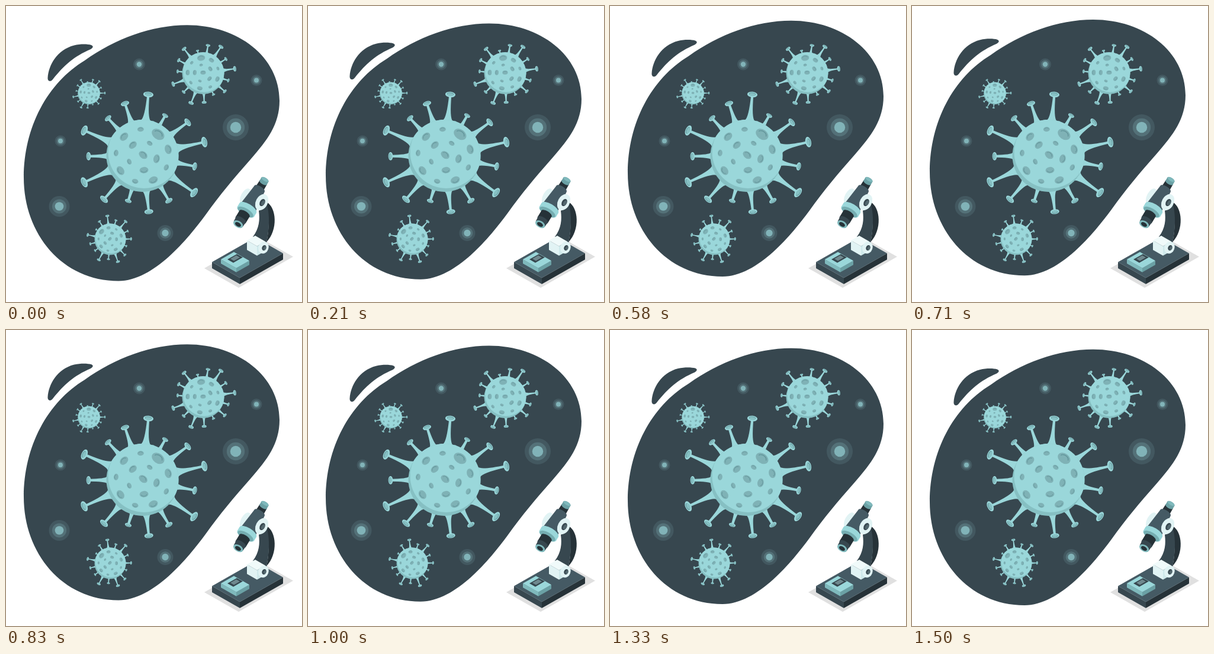
An HTML page with a canvas that plays this animation: 500x500 px, repeating every 1540 ms.

```html
<!DOCTYPE html>
<html lang="en">
<head>
<meta charset="utf-8">
<title>Virus under the microscope</title>
<style>
html, body { margin: 0; width: 100%; height: 100%; overflow: hidden; background: #fff; }
canvas { display: block; width: 500px; height: 500px; }
</style>
</head>
<body>
<canvas id="stage" width="500" height="500"></canvas>
<script>
const ctx = document.getElementById('stage').getContext('2d');
const LOOP = 1540, TURN = 720, LIFT = 10, RAD = Math.PI / 180;
const DARK = '#37474f', SLATE = '#455a64', INK = '#263238';
const AQUA = '#9ad7da', SHADE = '#86c0c3', TEAL = '#6ba1a5', PIT = '#7fb2b6', RIM = '#64989d', PALE = '#e1f3f4';

function fillPath(d, color) {
  ctx.fillStyle = color;
  ctx.fill(new Path2D(d));
}
function oval(x, y, rx, ry, deg, color) {
  ctx.beginPath();
  ctx.ellipse(x, y, rx, ry, deg * RAD, 0, Math.PI * 2);
  ctx.fillStyle = color;
  ctx.fill();
}
function placed(x, y, deg, paint) {
  ctx.save();
  ctx.translate(x, y);
  ctx.rotate(deg * RAD);
  paint();
  ctx.restore();
}

const BLOB = 'M30 290C30 205 70 130 133 92C184 55.5 246 32.2 306 32.2C392 32.2 462 86 462 160' +
  'C462 200 441 227 414 258C384 292 362 318 337 353C308 392 250 464.5 190 464.5C95 464.5 30 385 30 290Z';
const CRESCENT = 'M70.5 121C72 100 86 74 115 66.5C126 63.8 138 64.2 144 66C148 67.5 147.5 70.5 143 73' +
  'C115 85 98 100 79 124C75 129 70 127 70.5 121Z';

const glows = [[388, 205, 22], [90, 338.5, 17.5], [269, 383.5, 13.5], [225, 98.5, 10], [423, 125.5, 9.5], [92, 228, 9.5]];

// One virus design, drawn at several sizes and turns; r = body radius, k = spike scale
const viruses = [
  { x: 230.5, y: 253, r: 61, k: 1, turn: 0 },
  { x: 333, y: 113.5, r: 35.5, k: .503, turn: -43.5 },
  { x: 140, y: 147.5, r: 18.8, k: .253, turn: -36.5 },
  { x: 176, y: 394, r: 26.5, k: .372, turn: -84.5 }
];
const REACH = [107, 90, 107, 88, 95, 80, 98, 108, 91, 107, 86, 93, 104, 78, 95];

function spike(r, reach, k) {
  const base = r - r * .02, length = reach - base;
  const bend = base + length * .1, foot = length * .19, stem = 2 * k;
  const w = (5.5 + (reach / k - 78) * .12) * k;
  fillPath(`M${base} ${-foot}Q${bend} ${-stem * 1.15} ${reach} ${-stem}V${stem}Q${bend} ${stem * 1.15} ${base} ${foot}Z`, AQUA);
  oval(reach, 0, w * .55, w, 0, AQUA);
  oval(reach + w * .08, 0, w * .34, w * .68, 0, RIM);
  oval(reach, 0, w * .3, w * .6, 0, SHADE);
}

// Pit at polar place; its long side follows the rim
function pit(distance, deg, size, r) {
  placed(0, 0, deg, () => {
    const x = distance * r, long = size * r, thin = long * .72;
    oval(x, 0, thin, long, 0, PIT);
    ctx.beginPath();
    ctx.ellipse(x, 0, thin * .65, long * .65, 0, -1.4, 1.4);
    ctx.strokeStyle = RIM;
    ctx.lineWidth = long * .14;
    ctx.stroke();
  });
}

function virus({ x, y, r, k, turn }) {
  REACH.forEach((reach, i) => placed(x, y, turn - 12.5 + i * 24, () => spike(r, reach * k, k)));
  oval(x, y, r, r, 0, SHADE);
  ctx.save();
  ctx.clip();
  oval(x + r * .05, y - r * .1, r, r, 0, AQUA);
  ctx.restore();
  placed(x, y, turn, () => {
    pit(.03, -50, .13, r);
    for (let i = 0; i < 5; i++) pit(.4, -60 + i * 72, i % 3 ? .122 : .084, r);
    for (let i = 0; i < 9; i++) pit(.735, -54 + i * 40, i ? (i % 2 ? .132 : .09) : .19, r);
  });
}

function glow([x, y, r]) {
  oval(x, y, r, r, 0, 'rgba(154,215,218,.12)');
  oval(x, y, r * .69, r * .69, 0, 'rgba(154,215,218,.2)');
  oval(x, y, r * .42, r * .42, 0, 'rgba(154,215,218,.65)');
}

// Isometric plate from its left corner: a runs down right, b runs up right
function plate(x, y, a, b, color) {
  const s = .57;
  fillPath(`M${x} ${y}l${a} ${a * s}l${b} ${-b * s}l${-a} ${-a * s}Z`, color);
}
function box(x, y, a, b, h, top, left, right) {
  const s = .57;
  fillPath(`M${x} ${y}l${a} ${a * s}v${h}l${-a} ${-a * s}Z`, left);
  fillPath(`M${x + a} ${y + a * s}l${b} ${-b * s}v${h}l${-b} ${b * s}Z`, right);
  plate(x, y, a, b, top);
}

// Cylinder along the local y axis, with rounded ends
function tube(y0, y1, w0, w1, color) {
  oval(0, y0, w0, w0 * .42, 0, color);
  oval(0, y1, w1, w1 * .42, 0, color);
  fillPath(`M${-w0} ${y0}H${w0}L${w1} ${y1}H${-w1}Z`, color);
}

function knob(x, y, rx, ry, tilt) {
  oval(x, y, rx, ry, tilt, PALE);
  oval(x + 1, y + .5, rx * .42, ry * .45, tilt, DARK);
  oval(x + 2, y + 1, rx * .25, ry * .32, tilt, '#52676e');
}

function microscope() {
  plate(335, 443, 58, 92, '#e0e0e0');
  box(348, 432.5, 47, 73, 10.5, SLATE, DARK, INK);
  box(363, 428, 26, 22, 7, AQUA, '#7fb9bc', TEAL);
  plate(374, 428, 10, 16, DARK);
  plate(379, 427, 6, 10, '#6f888e');

  fillPath('M440 331C457 340 460 378 440 399C445 378 445 350 438 334Z', INK);
  fillPath('M427 346L440 333C446 350 445 378 440 400L417 390C428 375 429 361 427 346Z', DARK);
  box(407, 396, 17, 14, 16, '#f0fafa', PALE, '#cfe9eb');
  knob(435, 408, 8.5, 10.5, 20);

  oval(404, 321, 7, 14, 28, PALE);
  placed(437, 294, 31, () => {
    tube(5, 20, 7, 7.5, INK);
    tube(-1, 5, 7, 7, TEAL);
    oval(0, -1, 6.5, 2.7, 0, '#7fb9bc');
    tube(17, 55, 10, 14.5, SLATE);
    tube(55, 62, 16.5, 16.5, AQUA);
    oval(0, 63, 15, 6, 0, '#75adb1');
    tube(66, 79, 10, 10, INK);
    tube(78, 86, 9.5, 9, DARK);
    oval(0, 87, 9, 5.5, 0, '#7fb9bc');
    oval(0, 87.5, 5.5, 3.3, 0, INK);
  });
  knob(432, 331.5, 10, 14.5, 28);
}

function draw(now) {
  const away = Math.abs(now % LOOP - TURN);
  const near = Math.min(away, LOOP - away);
  const dy = near / (LOOP / 2) * LIFT - LIFT + .65;

  ctx.fillStyle = '#fff';
  ctx.fillRect(0, 0, 500, 500);
  placed(0, dy, 0, () => {
    fillPath(BLOB, DARK);
    fillPath(CRESCENT, DARK);
  });
  glows.forEach(glow);
  viruses.forEach(virus);
  microscope();
  requestAnimationFrame(draw);
}
requestAnimationFrame(draw);
</script>
</body>
</html>
```
